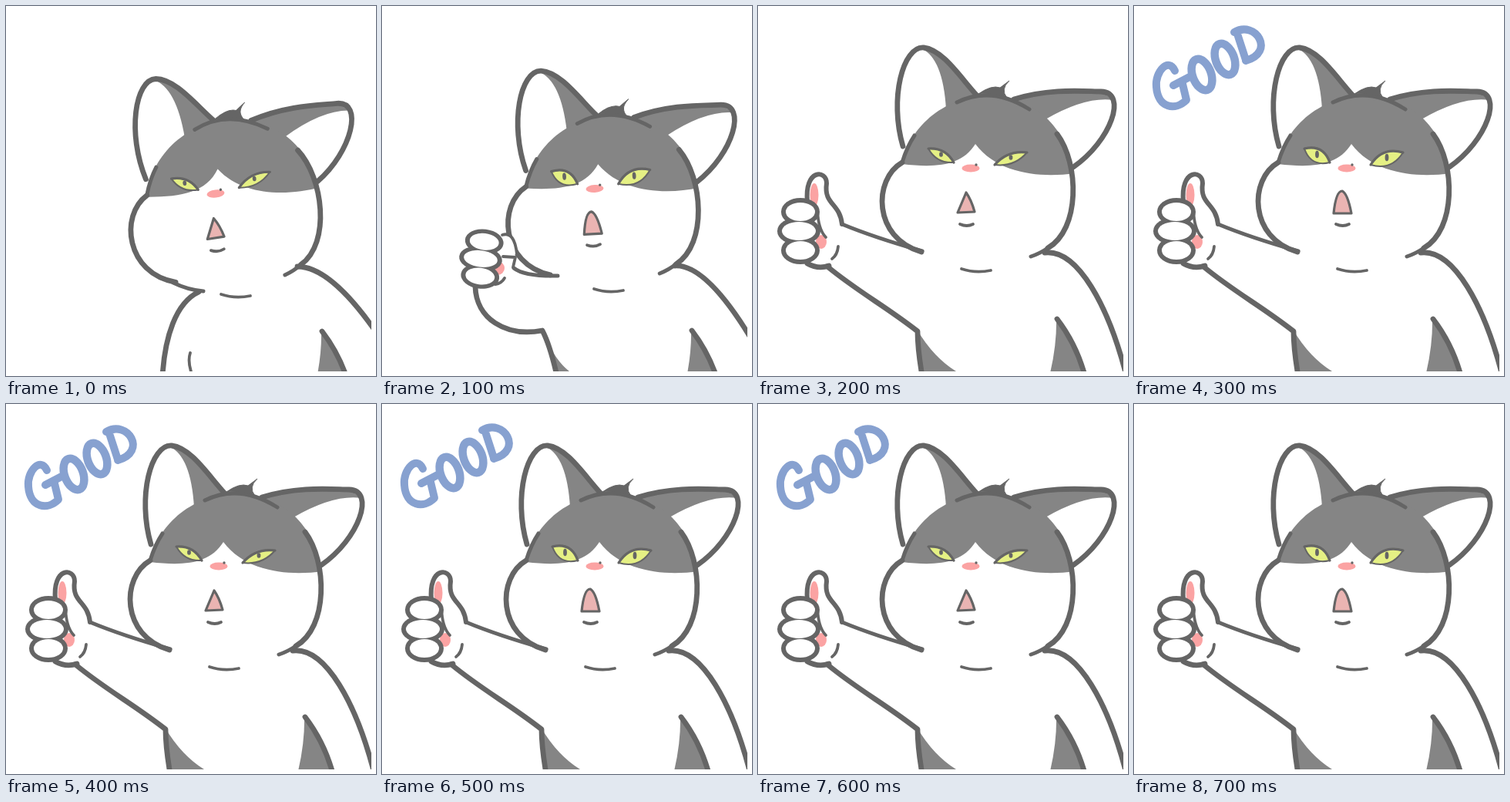
Recreate the animation shown at these times as an HTML page. Size 480 by 480 pixels, loop 800 ms.

```html
<!DOCTYPE html>
<html lang="en">
<head>
<meta charset="utf-8">
<title>Thumbs-up cat</title>
<style>
  html, body { margin: 0; width: 100%; height: 100%; overflow: hidden; background: #fff; }
  svg { display: block; width: 100%; height: 100%; }
  path { stroke-linecap: round; stroke-linejoin: round; }
</style>
</head>
<body>
<svg viewBox="0 0 480 480" aria-label="A cat gives a thumbs up: GOOD">
  <clipPath id="crop"><rect width="474" height="474"/></clipPath>
  <g id="scene" clip-path="url(#crop)"></g>
</svg>
<script>
const INK = '#656565', FUR = '#858585', PINK = '#fba3a3', MOUTH = '#eab4b2',
      EYE = '#e5f084', BLUE = '#87a1d0', WHITE = '#fff';
const BOLD = 6.8, MID = 5, THIN = 3.8;
const scene = document.getElementById('scene');

function add(parent, tag, attrs = {}) {
  const el = document.createElementNS('http://www.w3.org/2000/svg', tag);
  for (const k in attrs) el.setAttribute(k, attrs[k]);
  parent.appendChild(el);
  return el;
}
const group = (parent, transform = '') => add(parent, 'g', { transform });
const line = (g, d, width = BOLD, color = INK) =>
  add(g, 'path', { d, fill: 'none', stroke: color, 'stroke-width': width });
const shape = (g, d, color, width = 0) =>
  add(g, 'path', { d, fill: color, stroke: width ? INK : 'none', 'stroke-width': width });
const oval = (g, cx, cy, rx, ry, color) => add(g, 'ellipse', { cx, cy, rx, ry, fill: color });

// Almond between two corners; bulge is the height of each lid.
function drawEye(g, [ax, ay], [bx, by], bulge) {
  const mx = (ax + bx) / 2, my = (ay + by) / 2;
  const k = 2 * bulge / Math.hypot(bx - ax, by - ay);
  const nx = (by - ay) * k, ny = (ax - bx) * k;
  const upper = `M${ax},${ay}Q${mx + nx},${my + ny} ${bx},${by}`;
  shape(g, `${upper}Q${mx - nx},${my - ny} ${ax},${ay}`, EYE, 2);
  oval(g, mx, my - 1.5, 2.4, bulge * 0.55, INK);
  line(g, upper, 3.2);
}

// One head for every pose, turned about the nose and moved.
const NOSE = [276, 210.5];
function drawHead(pose, { turn, dx, dy, awake }) {
  const g = group(pose, `translate(${dx} ${dy}) rotate(${turn} ${NOSE})`);
  const leftEar = 'C240,57 262,92 283,115', rightEar = 'C380,106 425,111 445,111';
  shape(g, `M215,54${leftEar}L244,134Q240,68 212,55`, FUR);
  shape(g, `M330,121${rightEar}L461,122Q425,117 373,147L350,133`, FUR);
  shape(g, 'M187,205C192,170 230,117 300,117C372,117 405,175 410,217' +
           'C370,223 312,219 282,179C264,208 230,210 187,205', FUR);
  shape(g, 'M286,114Q303,102 314,106L326,97Q314,108 323,119Q303,113 286,114', INK, 1);

  line(g, `M188,182C170,120 188,52 215,54${leftEar}`);
  line(g, `M332,121${rightEar}C480,112 458,175 409,209`);
  line(g, 'M388,166C417,205 418,290 376,314');
  line(g, 'M187,203C149,225 149,301 212,319');
  line(g, 'M376,314Q366,321 354,325', MID);
  line(g, 'M203,168Q193,183 187,203', MID);
  line(g, 'M258,125Q303,103 352,134', MID);

  const bulge = awake ? 8.5 : 6;
  drawEye(g, [221, 185], [254, 203], bulge);
  drawEye(g, [307, 206], [349, 190], bulge);
  oval(g, ...NOSE, 11.5, 5, PINK);
  oval(g, 283, 206, 1.7, 1.7, INK);
  shape(g, awake ? 'M259,269Q262,240 270,240Q277,243 282,269Z' : 'M259,268L270,242Q277,252 281,267Z', MOUTH, 3.2);
  line(g, 'M262,283q9,4 17,0', THIN);
}

// Three finger lumps merged into one outline.
function drawFist(pose, transform) {
  const g = group(pose, transform);
  for (const [grow, color] of [[3, INK], [-3, WHITE]])
    for (const i of [-1, 0, 1])
      oval(g, i ? 1 : -1, 25 * i, (i ? 22 : 25) + grow, 15 + grow, color);
}

function drawChest(g, x, y, shoulder) {
  line(g, shoulder);
  line(g, `M${x},${y}q18,6 38,2`, THIN);
}

function drawFlank(g, x, y) {
  shape(g, `M${x},${y}q1,37 -9,77h47q-9,-40 -38,-77`, FUR);
  line(g, `M${x + 1},${y + 3}q26,34 37,77`, BOLD);
}

function drawRest(g) {
  drawFlank(g, 409, 419);
  drawChest(g, 279, 374, 'M378,338Q420,338 478,420');
  line(g, 'M250,371C220,385 206,430 203,480');
  line(g, 'M239,450Q235,462 242,480', THIN);
  drawHead(g, { turn: -6.2, dx: -4, dy: 33, awake: false });
  line(g, 'M217,359Q235,368 256,370', MID);
}

function drawLift(g) {
  shape(g, 'M211,428L226,474H243Q225,460 211,428', FUR);
  drawFlank(g, 401, 418);
  drawChest(g, 275, 367, 'M380,337Q420,335 478,430');
  line(g, 'M121,364C122,405 160,430 208,421Q218,440 227,480');
  drawHead(g, { turn: -3.2, dx: 0, dy: 26.5, awake: true });
  shape(g, 'M152,298Q172,292 175,322L157,325', WHITE);
  line(g, 'M156,297Q172,292 175,322M157,325L173,326L170,339', THIN);
  line(g, 'M171,340Q185,351 228,350', MID);
  oval(g, 150, 340, 9, 9, PINK);
  line(g, 'M147,361Q155,360 159,353', THIN);
  drawFist(g, 'translate(129 328) rotate(7) scale(1 .9)');
}

function drawThumb(g, awake) {
  shape(g, 'M207,421L214,474H257Q228,456 207,421', FUR);
  drawFlank(g, 387, 403);
  drawChest(g, 264, 341, 'M372,320C415,315 455,390 478,480');
  line(g, 'M109,283Q150,300 213,318', MID);
  line(g, 'M90,338C130,371 165,389 207,422Q207,445 213,480');
  drawHead(g, { turn: 0, dx: 0, dy: 0, awake });
  oval(g, 73, 245, 5.5, 15, PINK);
  oval(g, 82, 306, 7, 9, PINK);
  line(g, 'M64,254C60,211 89,212 89,230C85,258 106,255 109,283', 6);
  line(g, 'M77,264Q78,290 88,300M104,312Q103,323 96,328', THIN);
  line(g, 'M64,334Q78,342 92,337');
  drawFist(g, 'translate(54 292)');
}

function makePose(draw, awake) {
  const g = group(scene);
  draw(g, awake);
  return g;
}

// Brush lettering: G, O, O, D
function drawWord(g) {
  const brush = d => line(g, d, 10, BLUE);
  brush('M53,84C45,66 27,85 29,105C31,133 54,136 68,122L62,97M51,103L74,91');
  for (const [x, y] of [[88, 89], [118, 69]])
    add(group(g, `translate(${x} ${y}) rotate(-20)`), 'ellipse',
      { rx: 12, ry: 21, fill: 'none', stroke: BLUE, 'stroke-width': 10.5 });
  brush('M133,33L145,70M130,34C158,18 184,60 145,71');
}

const resting = makePose(drawRest);
const lifting = makePose(drawLift);
const squinting = makePose(drawThumb, false);
const staring = makePose(drawThumb, true);
const word = makePose(drawWord);

const STEP = 100, STEPS = 8, WORD_IN = 3, WORD_OUT = 7;
const show = (el, on) => el.setAttribute('display', on ? 'inline' : 'none');

function render(t) {
  const step = Math.floor(t / STEP) % STEPS;
  const odd = step % 2 === 1;
  show(resting, step === 0);
  show(lifting, step === 1);
  show(squinting, step > 1 && !odd);
  show(staring, step > 1 && odd);
  show(word, step >= WORD_IN && step < WORD_OUT);
  word.setAttribute('transform', `translate(0 ${odd ? 0 : 2})`);
}

const start = performance.now();
function tick() {
  render(performance.now() - start);
  requestAnimationFrame(tick);
}
tick();
</script>
</body>
</html>
```
